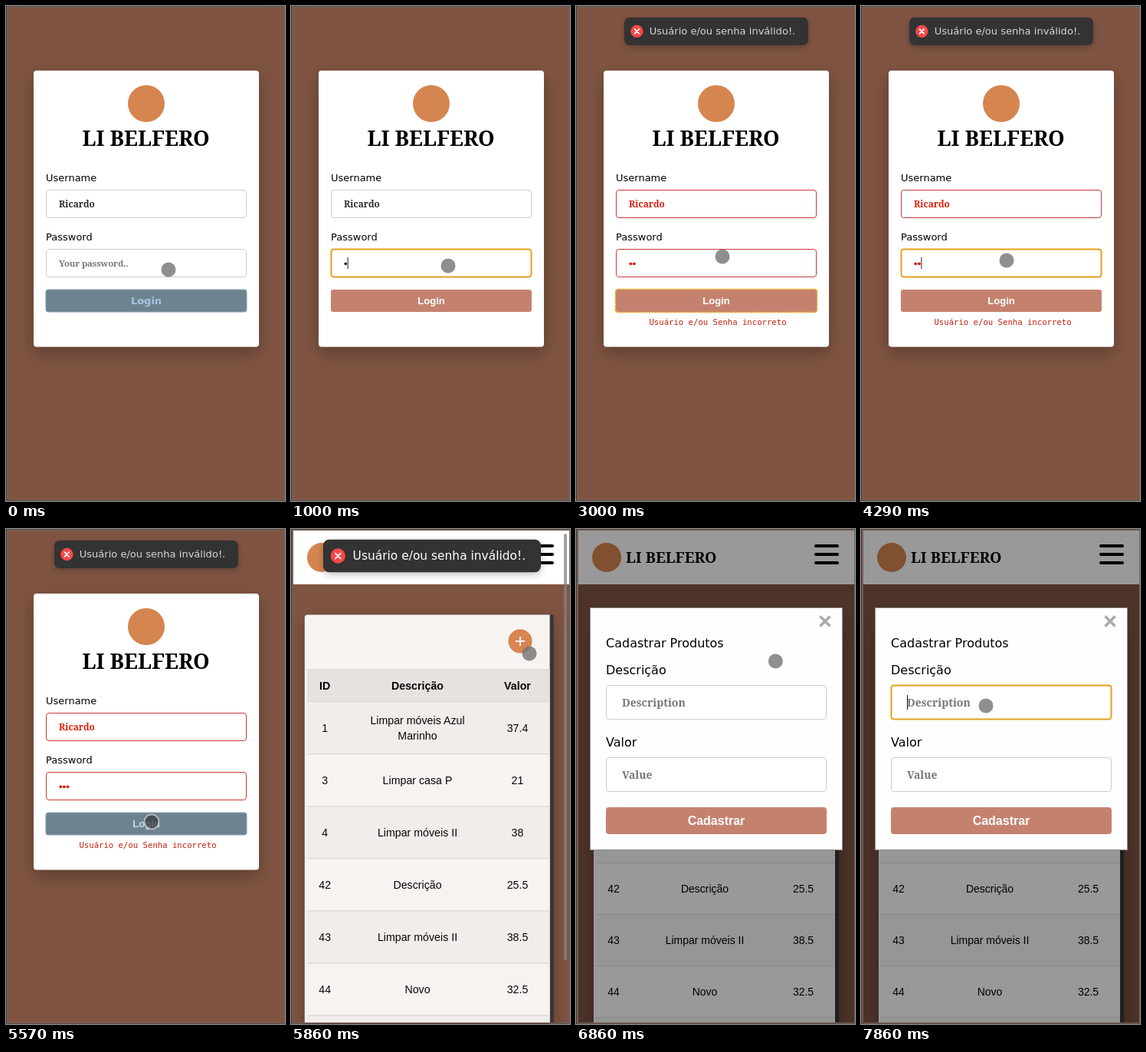
Recreate the animation shown at these times as an HTML page. Size 364x644 px, loop 8000 ms.

```html
<!DOCTYPE html>
<html lang="pt">
<head>
<meta charset="utf-8">
<title>Login</title>
<style>
html, body { margin: 0; width: 100%; height: 100%; overflow: hidden; background: #3b3b3b; }
svg { display: block; width: 100vw; height: 100vh; }
.ui { font-family: "DejaVu Sans", sans-serif; }
.sans { font-family: "Liberation Sans", Arial, sans-serif; }
.mono { font-family: "DejaVu Sans Mono", monospace; }
.slab { font-family: "Noto Serif", serif; font-weight: 700; }
.b { font-weight: 700; }
.mid { text-anchor: middle; }
.shade { filter: drop-shadow(0 8px 11px rgba(0,0,0,.28)); }
</style>
</head>
<body>
<svg id="stage" viewBox="0 0 364 644"></svg>
<script>
const LOOP = 8000;
const BRAND = 'LI BELFERO', USER = 'Ricardo';
const ORANGE = '#e5a01c', RED = '#cc3a3a', INK_RED = '#d81e0c', CLAY = '#c4826e';

const rect = (x, y, w, h, fill, more = '') =>
  `<rect x="${x}" y="${y}" width="${w}" height="${h}" fill="${fill}" ${more}/>`;
const text = (x, y, size, cls, s, more = '') =>
  `<text x="${x}" y="${y}" font-size="${size}" class="${cls}" ${more}>${s}</text>`;
const field = (id, x, y, w, h) =>
  rect(x + .5, y + .5, w - 1, h - 1, '#fff', `id="${id}" rx="3.5" stroke="#ccc"`);

function loginPage() {
  return `<g id="login">
    ${rect(36, 84, 294, 359.5, '#fff', 'rx="4" class="shade"')}
    <circle cx="183" cy="127" r="24" fill="#d5854f"/>
    ${text(182.5, 182, 27.5, 'slab mid', BRAND)}
    ${text(52, 228, 13, 'ui', 'Username')}
    ${field('user', 52, 239, 262, 37)}
    ${text(69, 262, 11.8, 'slab', USER, 'id="name"')}
    ${text(52, 305, 13, 'ui', 'Password')}
    ${field('pass', 52, 316, 262, 37)}
    ${text(69, 339, 11.5, 'slab', 'Your password..', 'id="hint" fill="#777" letter-spacing="-.2"')}
    <g id="dots">${[71.3, 75.9, 80.6].map(x => `<circle cx="${x}" cy="335.3" r="1.9"/>`).join('')}</g>
    ${rect(0, 327, 1, 15, '#222', 'id="caret"')}
    ${rect(52, 369, 262, 29, CLAY, 'id="btn" rx="3"')}
    ${rect(51.5, 368.5, 263, 30, 'none', `id="ring" rx="3" stroke="${ORANGE}" stroke-width="1.5" stroke-dasharray="2 .6"`)}
    ${text(183, 387.5, 13.06, 'sans b mid', 'Login', 'id="go"')}
    ${text(183, 388, 13, 'ui b mid', 'Login', 'id="goFirst" fill="#a9c4e8"')}
    ${text(185, 415, 10.63, 'mono mid', 'Usuário e/ou Senha incorreto', 'id="error" fill="#c4200f"')}
  </g>`;
}

function tableRow([id, name, value], i) {
  const y = 233 + 67 * i, c = y + 39;
  const lines = name.split('|');
  const label = lines.map((s, k) =>
    text(168, c + (lines.length > 1 ? k * 20 - 10 : 0), 14, 'sans mid', s)).join('');
  return rect(26, y, 312, 67, i % 2 ? '#fff' : '#f9f9f9') + rect(26, y, 312, 1, '#ddd') +
    text(49, c, 14, 'sans mid', id) + label + text(296.5, c, 14, 'sans mid', value);
}

function listPage() {
  const rows = [
    ['1', 'Limpar móveis Azul|Marinho', '37.4'], ['3', 'Limpar casa P', '21'],
    ['4', 'Limpar móveis II', '38'], ['42', 'Descrição', '25.5'],
    ['43', 'Limpar móveis II', '38.5'], ['44', 'Novo', '32.5'], ['', '', '']
  ];
  const heads = [[49, 'ID'], [168, 'Descrição'], [296.5, 'Valor']];
  return `<g id="list">
    <g id="card">
      <path d="M23 680V126q0-4 4-4H343V680Z" fill="#333" class="shade"/>
      <path d="M23 680V126q0-4 4-4H338V680Z" fill="#fff"/>
      ${rect(26, 192, 312, 41, '#ededed')}${rect(26, 192, 312, 1, '#ddd')}
      ${heads.map(([x, s]) => text(x, 218, 14, 'sans b mid', s)).join('')}
      ${rows.map(tableRow).join('')}
      <circle cx="300" cy="156" r="15.3" fill="#e08855"/>
      <path d="M294 156h12M300 150v12" stroke="#fff" stroke-width="2"/>
    </g>
    ${rect(3, 2, 360, 70, '#fff')}
    <circle cx="40" cy="37" r="19" fill="#d5854f"/>
    ${text(65, 44, 19.6, 'slab', BRAND)}
    <path d="M313 22h28M313 33h28M313 44h28" stroke="#000" stroke-width="4" stroke-linecap="round"/>
    ${rect(356, 6, 4, 555, '#85807d', 'id="bar" rx="2" opacity=".75"')}
  </g>`;
}

function modal() {
  return `<g id="modal">
    ${rect(3, 2, 360, 640, '#000', 'opacity=".4"')}
    <g id="dialog">
      ${rect(18.5, 102.5, 329, 315, '#fefefe', 'stroke="#888"')}
      <path d="M318.5 113.5l13 13M331.500 113.5l-13 13" stroke="#aaa" stroke-width="3.6"/>
      ${text(39, 154, 16, 'ui', 'Cadastrar Produtos')}
      ${text(39, 189, 16, 'ui', 'Descrição')}
      ${field('desc', 39, 203, 288, 45)}
      ${text(60, 231, 14, 'slab', 'Description', 'fill="#777"')}
      ${rect(60, 216, 1, 19, '#111', 'id="caret2"')}
      ${text(39, 283, 16, 'ui', 'Valor')}
      ${field('value', 39, 297, 288, 45)}
      ${text(60, 325, 14, 'slab', 'Value', 'fill="#777"')}
      ${rect(39, 362, 288, 35, CLAY, 'rx="4"')}
      ${text(183, 384.5, 16, 'sans b mid', 'Cadastrar', 'fill="#fff"')}
    </g>
  </g>`;
}

// The toast is drawn around its own centre.
const toast = `<g id="toast">
  ${rect(-147, -22, 294, 44, '#333', 'rx="8" style="filter:drop-shadow(0 3px 5px rgba(0,0,0,.25))"')}
  <circle cx="-127" cy="0" r="10" fill="#f84848"/>
  <path d="M-130.500 -3.500l7 7M-123.500 -3.500l-7 7" stroke="#fff" stroke-width="2" stroke-linecap="round"/>
  ${text(-107, 5, 16, 'ui', 'Usuário e/ou senha inválido!.', 'id="note"')}
</g>`;

const stage = document.getElementById('stage');
stage.innerHTML = `
  <clipPath id="screen">${rect(2.5, 2, 361, 640, '#fff')}</clipPath>
  ${rect(0, 0, 364, 644, '#3b3b3b')}
  ${rect(1.500, 1, 362, 642, '#805442', 'stroke="#706661"')}
  <g clip-path="url(#screen)">
    ${loginPage()}${listPage()}${modal()}${toast}
    <circle id="touch" r="9.5"/>
  </g>`;

const el = {};
stage.querySelectorAll('[id]').forEach(n => el[n.id] = n);

const set = (id, attrs) => { for (const k in attrs) el[id].setAttribute(k, attrs[k]); };
const show = (id, on) => set(id, { visibility: on ? 'inherit' : 'hidden' });
const clamp = v => Math.max(0, Math.min(1, v));
const span = (t, a, b) => clamp((t - a) / (b - a));
const smooth = p => p * p * (3 - 2 * p);
const out = p => 1 - (1 - p) ** 3;
const within = (t, list) => list.some(([a, b]) => t >= a && t < b);

// Value of [time, ...numbers] keys at t.
function track(keys, t, ease = p => p) {
  let i = 0;
  while (i < keys.length - 2 && t >= keys[i + 1][0]) i++;
  const a = keys[i], b = keys[i + 1], p = ease(span(t, a[0], b[0]));
  return a.slice(1).map((v, k) => v + (b[k + 1] - v) * p);
}

const PATH = [
  [0, 212, 343], [400, 205, 338], [1300, 205, 338], [1800, 195, 375], [2450, 195, 376],
  [3000, 191, 326], [3250, 190, 331], [4700, 190, 331], [5300, 190, 381], [5620, 190, 381],
  [5860, 311, 162], [6300, 299, 149], [6650, 299, 149], [7250, 163, 230], [LOOP, 163, 230]
];
const PRESSES = [[420, 560], [1780, 2200], [3260, 3400], [5420, 5670], [6380, 6540], [7330, 7460]];
const TOAST = [[5700, 183, 33, .87], [5860, 184, 35, .966], [6000, 183, 40, 1]];
const FAILED = 2400, ENTERED = 5700, TOAST_END = 6450, OPENED = 6570;

function drawLogin(t) {
  const failed = t >= FAILED;
  const focus = within(t, [[500, 2000], [3350, 5480]]);
  const count = t < 1000 ? 0 : t < 1290 ? 1 : t < 3850 ? 2 : t < 4000 ? 1 : t < 4140 ? 0 :
    t < 4290 ? 1 : t < 4430 ? 2 : 3;
  const glow = within(t, [[0, 140], [2000, 2280], [5480, ENTERED]]);
  const first = t < 140;
  const line = failed ? RED : '#ccc', ink = failed ? INK_RED : '#2b2b2b';
  set('user', { stroke: line });
  set('name', { fill: ink });
  set('pass', { stroke: focus ? ORANGE : line, 'stroke-width': focus ? 2 : 1 });
  set('dots', { fill: ink });
  [...el.dots.children].forEach((d, i) => d.setAttribute('visibility', i < count ? 'inherit' : 'hidden'));
  show('hint', count === 0);
  const since = t - (t < 3350 ? 500 : 3350);
  show('caret', focus && (since % 1000 < 500 || within(t, [[1000, 1900], [3850, 4900]])));
  set('caret', { x: 69 + count * 4.7 });
  set('btn', { fill: glow ? '#6d838e' : CLAY, stroke: glow ? '#83a3bd' : 'none' });
  show('ring', failed && t < 3350);
  show('go', !first);
  set('go', { fill: glow ? '#c3dcee' : '#fff' });
  show('goFirst', first);
  show('error', failed);
}

function drawList(t) {
  const [scale, alpha] = track([[5700, 1.03, .8], [5860, 1.0155, .93], [6000, 1, 1]], t);
  set('card', {
    transform: `translate(362 800) scale(${scale}) translate(-362 -800)`, opacity: alpha
  });
  set('bar', { opacity: .75 * (1 - span(t, 6500, 6800)) });
}

function drawToast(t) {
  show('toast', t >= FAILED && t < TOAST_END + 400);
  let [x, y, s] = t < ENTERED ? [183, 33, .816] : track(TOAST, t);
  const enter = out(span(t, FAILED, FAILED + 350));
  const leave = smooth(span(t, TOAST_END, TOAST_END + 400));
  y -= 72 * (1 - enter) + 66 * leave;
  s *= (.6 + .4 * enter) * (1 - .4 * leave);
  set('toast', {
    transform: `translate(${x} ${y}) scale(${s})`,
    opacity: (.5 + .5 * enter) * (1 - leave)
  });
  set('note', { fill: t < ENTERED ? '#d8d8d8' : '#fff' });
}

function drawModal(t) {
  show('modal', t >= OPENED);
  const p = smooth(span(t, OPENED, OPENED + 250));
  set('dialog', { transform: `translate(0 ${-60 * (1 - p)})`, opacity: p });
  const focus = t >= 7400;
  set('desc', { stroke: focus ? ORANGE : '#ccc', 'stroke-width': focus ? 2 : 1 });
  show('caret2', focus && (t - 7400) % 1000 < 500);
}

function drawTouch(t) {
  const [cx, cy] = track(PATH, t, smooth);
  const down = within(t, PRESSES);
  set('touch', {
    cx, cy,
    fill: down ? 'rgba(45,45,45,.65)' : 'rgba(115,115,115,.8)',
    stroke: down ? 'rgba(225,225,225,.65)' : 'none',
    'stroke-width': 2
  });
}

function draw(t) {
  show('login', t < ENTERED);
  show('list', t >= ENTERED);
  drawLogin(t);
  drawList(t);
  drawToast(t);
  drawModal(t);
  drawTouch(t);
}

function tick() {
  draw(performance.now() % LOOP);
  requestAnimationFrame(tick);
}
tick();
</script>
</body>
</html>
```
